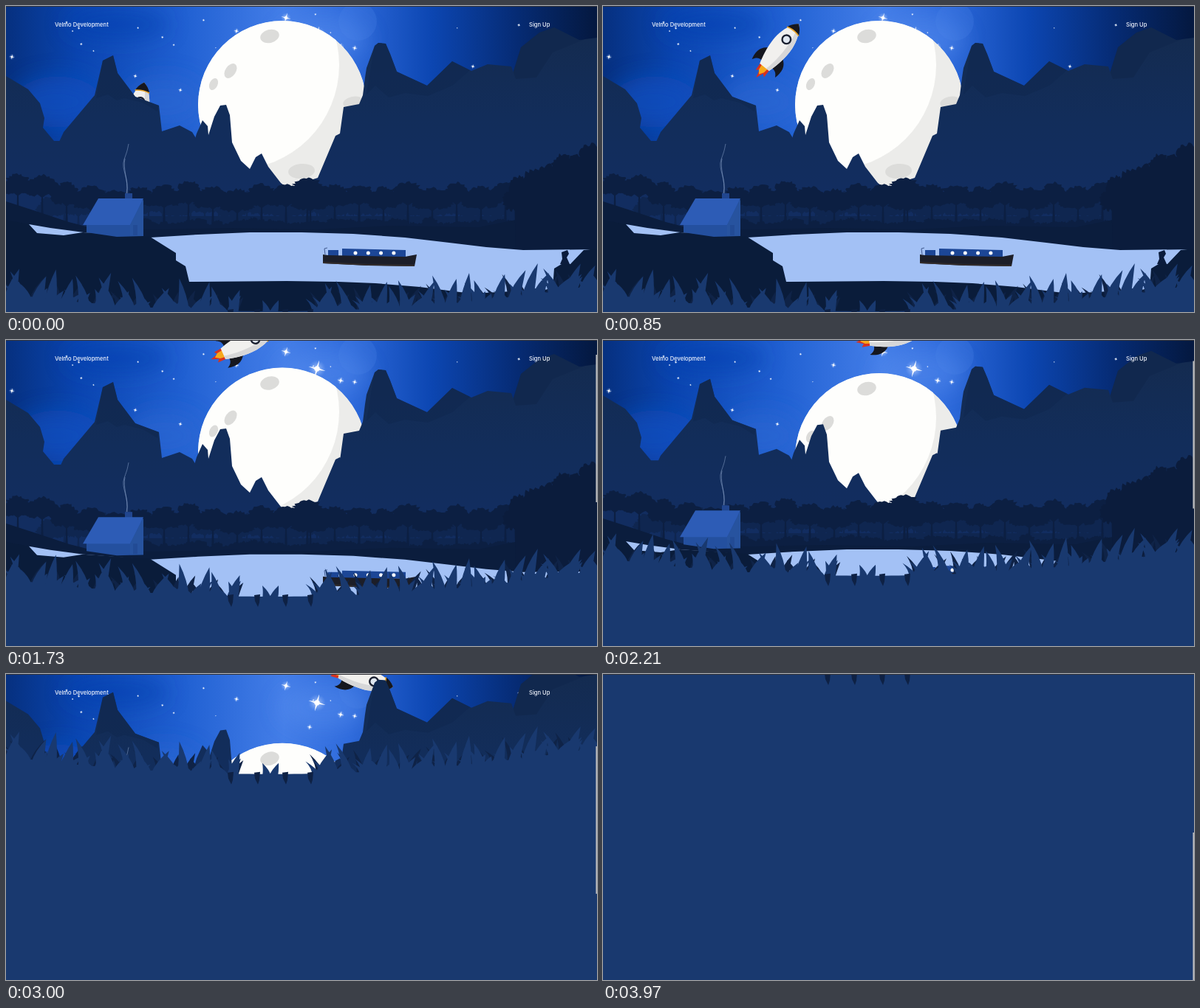
These frames come from a looping animation (800 px wide and 415 px high, 5 s). An HTML page:

```html
<!DOCTYPE html>
<html lang="en">
<head>
<meta charset="utf-8">
<title>Night river</title>
<style>
  html, body { margin: 0; width: 100%; height: 100%; overflow: hidden; background: #19396f; }
  svg { display: block; width: 800px; height: 415px; }
  text { font: 500 7.6px Inter, "Open Sans", sans-serif; fill: #f4f7ff; }
</style>
</head>
<body>
<svg viewBox="0 0 800 415" xmlns="http://www.w3.org/2000/svg">
  <defs>
    <linearGradient id="sky">
      <stop offset="0" stop-color="#06307f"/>
      <stop offset=".12" stop-color="#0a45b0"/>
      <stop offset=".3" stop-color="#2060d2"/>
      <stop offset=".47" stop-color="#447ee8"/>
      <stop offset=".58" stop-color="#2f6bdc"/>
      <stop offset=".72" stop-color="#0c46b2"/>
      <stop offset=".86" stop-color="#062c76"/>
      <stop offset="1" stop-color="#04183f"/>
    </linearGradient>
    <linearGradient id="rock" gradientUnits="userSpaceOnUse" x1="0" y1="40" x2="0" y2="260">
      <stop offset="0" stop-color="#142b50"/>
      <stop offset=".5" stop-color="#122d5a"/>
      <stop offset="1" stop-color="#122d60"/>
    </linearGradient>
    <radialGradient id="glow">
      <stop offset="0" stop-color="#fff" stop-opacity=".6"/>
      <stop offset="1" stop-color="#9cc0ff" stop-opacity="0"/>
    </radialGradient>
    <filter id="soft" x="-50%" y="-50%" width="200%" height="200%"><feGaussianBlur stdDeviation="14"/></filter>
    <clipPath id="disc"><circle cx="374" cy="134" r="114"/></clipPath>
  </defs>

  <rect width="800" height="415" fill="url(#sky)"/>
  <g filter="url(#soft)">
    <ellipse cx="70" cy="130" rx="60" ry="35" fill="#0a4fc0" opacity=".7"/>
    <ellipse cx="215" cy="130" rx="55" ry="35" fill="#2c68d2" opacity=".6"/>
    <ellipse cx="150" cy="25" rx="70" ry="22" fill="#0a3fae" opacity=".5"/>
    <ellipse cx="430" cy="45" rx="60" ry="30" fill="#5c92f0" opacity=".4"/>
  </g>
  <circle cx="476" cy="21" r="26" fill="#4d82e6" opacity=".25"/>
  <g id="stars" fill="#fff"></g>

  <g id="moon" clip-path="url(#disc)">
    <circle cx="374" cy="134" r="114" fill="#ececea"/>
    <circle cx="309" cy="80" r="142" fill="#fefefc"/>
    <g fill="#dcdcda">
      <ellipse rx="13" ry="9" transform="translate(357 41) rotate(-15)"/>
      <ellipse rx="11" ry="7" transform="translate(304 88) rotate(-55)"/>
      <ellipse rx="8.5" ry="5.5" transform="translate(281 106) rotate(-65)"/>
      <ellipse rx="13" ry="7" transform="translate(469 130) rotate(-15)"/>
      <ellipse rx="18" ry="10" transform="translate(400 224) rotate(-5)"/>
    </g>
  </g>

  <!-- local origin is the nose tip, pointing up -->
  <g id="rocket">
    <path d="M-8 72L-7 85L-3 82L0 93L4 83L8 86L8 72Z" fill="#d8321f"/>
    <path d="M-5 74L-4 82L0 87L4 81L5 74Z" fill="#f7a81c"/>
    <path d="M-11 50C-22 56-23 66-20 77C-17 71-13 69-8 70ZM11 50C22 56 23 66 20 77C17 71 13 69 8 70Z" fill="#15171f"/>
    <path d="M0 0C9 8 14 24 14 38C14 53 11 65 8 75L-8 75C-11 65-14 53-14 38C-14 24-9 8 0 0Z" fill="#f1f0ee"/>
    <path d="M0 0C9 8 14 24 14 38C14 53 11 65 8 75L3 75C8 55 9 25 0 0Z" fill="#d7d7d8"/>
    <path d="M0 0C5 4 8 8 10 13Q0 10-10 13C-8 8-5 4 0 0Z" fill="#16171d"/>
    <path d="M-10 13Q0 10 10 13" fill="none" stroke="#e9a42a" stroke-width="1.6"/>
    <circle cy="27" r="5.8" fill="#dfe6ef" stroke="#1b2030" stroke-width="2.4"/>
  </g>

  <g id="peaks">
    <path d="M680 110L687 88L697 56L722 36L742 29L776 46L800 44V300H660Z" fill="#11284e"/>
    <path fill="url(#rock)" d="M60 210L78 171L120 121L131 74L145 67L151 91L175 123L207 135L211 170L235 162L252 171L270 200V300H60ZM440 240L452 173L457 137L478 133L483 121L486 97L488 84L499 54L504 50L514 51L520 65L529 89L570 108L604 75L630 88L652 79L684 82L690 99L718 97L740 63L784 45L800 43V360H440Z"/>
    <path fill="#102850" opacity=".65" d="M131 74L145 67L151 91L175 123L207 135L205 143L185 131L160 125L150 128L138 120L122 125ZM499 54L504 50L514 51L520 65L529 89L570 108L604 75L628 87L604 108L571 122L540 118L518 124L500 108L488 120Z"/>
  </g>
  <path id="hills" fill="url(#rock)" d="M0 95L30 113L46 132L52 152L50 165L65 183H75L110 200H250L258 173L266 155L273 163L274 175L282 150L290 135L298 134L303 148L306 185L318 210L330 221L338 205L346 200L355 218L372 240L384 249L400 240L422 233L446 176L452 173L470 190L800 220V360H0Z"/>

  <g id="woods"></g>

  <g id="home">
    <path d="M163 254C168 235 155 222 160 208S164 196 166 187M164 254C165 235 158 220 161 207" fill="none" stroke="#9db3da" stroke-width=".8" opacity=".6"/>
    <rect x="161" y="254" width="10" height="9" fill="#21468f"/>
    <path d="M109 296H167L185 262L186 312L150 313L109 307Z" fill="#24509f"/>
    <path d="M125 261H186L168 297H104Z" fill="#2d5cb6"/>
    <path d="M168 297L186 262V312H168Z" fill="#27539f"/>
    <rect x="172" y="297" width="6" height="14" fill="#224b95"/>
  </g>

  <g id="boat">
    <path d="M432 337L431 329L435 328" fill="none" stroke="#2a4277" stroke-width=".8"/>
    <path d="M436 331H450V339H436ZM455 329L541 331V340H455Z" fill="#1c4696"/>
    <path d="M429 337L436 338L540 340L556 337L553 353L490 352L429 349Z" fill="#1c1e28"/>
    <path d="M429 347V349L490 352L553 353V351L490 350Z" fill="#322c2b"/>
    <path d="M473 335H526" stroke="#fff" stroke-width="5" stroke-linecap="round" stroke-dasharray="0 17.3"/>
  </g>

  <text x="66" y="28.4">Velmo Development</text>
  <text x="708" y="28.4">Sign Up</text>

  <g id="grass"></g>
  <rect id="thumb" x="798.5" width="1.5" height="200" fill="#c1c1c1"/>
  <rect width="800" height="1" fill="#34353b"/>
</svg>

<script>
const $ = id => document.getElementById(id);
const path = (d, fill) => `<path d="${d}" fill="${fill}"/>`;
const n = v => v.toFixed(1);
let seed = 11;
const rnd = (a, b) => {
  seed = (seed * 16807) % 2147483647;
  return a + (b - a) * seed / 2147483647;
};
const loop = (from, to, step, fn) => {
  let out = '';
  for (let x = from; x < to; x += step) out += fn(x);
  return out;
};

// stars: a few bright ones, the rest scattered
const star = (x, y, r) => {
  const k = r * .12;
  return `<g transform="translate(${x} ${y}) rotate(15)"><circle r="${r}" fill="url(#glow)"/><circle r="${r * .3}"/>
    <path d="M0 ${-r}L${k} ${-k}L${r} 0L${k} ${k}L0 ${r}L${-k} ${k}L${-r} 0L${-k} ${-k}Z"/></g>`;
};
const bright = [[421, 39, 12], [379, 16, 7], [312, 34, 4], [453, 55, 5], [472, 57, 4], [411, 72, 4],
  [175, 95, 3], [236, 114, 3], [8, 69, 4], [632, 82, 3], [82, 22, 2]];
$('stars').innerHTML = bright.map(v => star(...v)).join('') +
  loop(0, 14, 1, () => star(n(rnd(90, 720)), n(rnd(5, 70)), n(rnd(1, 2.5))));

// trees: ragged leafy lobes over a thin trunk
function lobe(x, y, w, h) {
  const pts = [];
  for (let a = 0; a < 6.28; a += .16) {
    const q = rnd(.8, 1.12) / 2;
    pts.push(n(x + Math.cos(a) * w * q) + ' ' + n(y + Math.sin(a) * h * q));
  }
  return 'M' + pts.join('L') + 'Z';
}
const tree = (x, top, w, h) =>
  lobe(x, top + h * .4, w * .7, h * .8) + lobe(x - w * .24, top + h * .65, w * .55, h * .6) +
  lobe(x + w * .24, top + h * .62, w * .55, h * .6) +
  `M${n(x - 2)} 305L${n(x - 1)} ${n(top + h)}L${n(x - w * .25)} ${n(top + h * .7)}H${n(x + w * .25)}L${n(x + 1)} ${n(top + h)}L${n(x + 2)} 305Z`;

$('woods').innerHTML =
  path(loop(60, 700, 19, x => tree(x, rnd(250, 258), 38, 30)) + 'M180 285H690V310H180Z', '#0f2650') +
  path(loop(16, 700, 33, x => tree(x, 240 - 26 * Math.exp(-x / 40) + rnd(-4, 12), rnd(42, 58), rnd(26, 34))) +
    tree(408, 233, 58, 28), '#0c1f42') +
  path(loop(190, 800, 12, x => lobe(x, rnd(296, 302), rnd(16, 24), rnd(12, 20))), '#0c1f42') +
  path('M0 265L40 278L85 293L120 302L200 303L300 301L420 303L520 298L640 300L690 290L800 272V345H0Z', '#0b1d3d') +
  '<g id="grove">' + path(loop(696, 810, 19, x => tree(x, 228 - (x - 690) * .35 + rnd(-8, 6), 46, 50)) +
    'M688 258L720 236L800 225V330H690Z', '#0b1c3c') + '</g>' +
  path('M31 296L60 301L105 307L195 314L260 310L330 307L400 307L470 309L540 314L600 321L650 327L700 331L800 330V400H40Z', '#a3c1f5') +
  path('M752 334L760 331L762 336L759 341L763 350H750L753 343Z', '#0b1c3c') +
  path('M0 290L31 296L42 308L78 311L104 307L195 313L230 335V345L243 353L248 374L380 373L450 374L500 376L560 381L630 390L740 384L742 356L752 350L764 350L782 331L800 329V560H0Z', '#0a1c3a');

// grass: leaning blades on a shallow bowl, only short ones in its middle
const ground = x => 414 - (x - 360) ** 2 / 5400;
const bare = x => x > 310 && x < 416;
function blade(x, h, lean, w) {
  const b = ground(x) + 3, m = b - h * .5, tip = x + lean;
  return `M${n(x - w)} ${n(b)}Q${n(x - w * .6 + lean * .15)} ${n(m)} ${n(tip)} ${n(b - h)}Q${n(x + w * .9 + lean * .3)} ${n(m)} ${n(x + w)} ${n(b)}Z`;
}
const blades = (step, low, high, w) => loop(4, 800, step, x =>
  bare(x) ? '' : blade(x + rnd(-4, 4), rnd(low, high), rnd(5, 17) * (rnd(0, 1) < .5 ? -1 : 1), w));
const chip = x => `M${x - 4} 412L${x + 4} 411L${x + 3} 422L${x + 1} 428L${x - 3} 420Z`;
$('grass').innerHTML =
  path(blades(17, 18, 34, 6), '#0f2347') +
  path(blades(20, 30, 46, 8) + blades(9, 10, 24, 6) + blade(353, 18, -6, 6) + blade(362, 18, 7, 6) +
    'M0 900' + loop(0, 801, 10, x => `L${x} ${n(ground(x))}`) + 'V900Z', '#19396f') +
  path([304, 340, 378, 412].map(chip).join(''), '#0e2144');

// straight interpolation between key points
function key(ks, vs, k) {
  if (k <= ks[0]) return vs[0];
  const i = ks.findIndex(v => v > k);
  if (i < 0) return vs[vs.length - 1];
  return vs[i - 1] + (vs[i] - vs[i - 1]) * (k - ks[i - 1]) / (ks[i] - ks[i - 1]);
}

// vertical speed of each layer relative to the grass
const rates = { moon: .265, peaks: -.152, hills: -.21, woods: -.245, home: -.315, boat: -.245, grove: -.065, grass: -1 };

function draw(t) {
  const s = key([1.56, 1.73, 2.18, 2.45, 3, 3.27, 3.61, 3.82], [0, 66, 85, 165, 278, 337, 337, 413], t);
  for (const id in rates) $(id).setAttribute('transform', `translate(0 ${n(s * rates[id])})`);
  const x = key([0, .85, 1.73, 2.45, 3, 3.61], [187, 265, 362, 470, 524, 592], t);
  const y = 30 * (t - 1.98) ** 2 - 14;
  $('rocket').setAttribute('transform', `translate(${n(x)} ${n(y)}) rotate(${n(12 + 31 * t)})`);
  $('thumb').setAttribute('y', n(key([0, 165, 337, 413], [0, 50, 123, 215], s)));
  $('thumb').setAttribute('opacity', s > 0 ? 1 : 0);
}

const start = performance.now();
function tick() {
  draw((performance.now() - start) % 5000 / 1000);
  requestAnimationFrame(tick);
}
tick();
</script>
</body>
</html>
```
